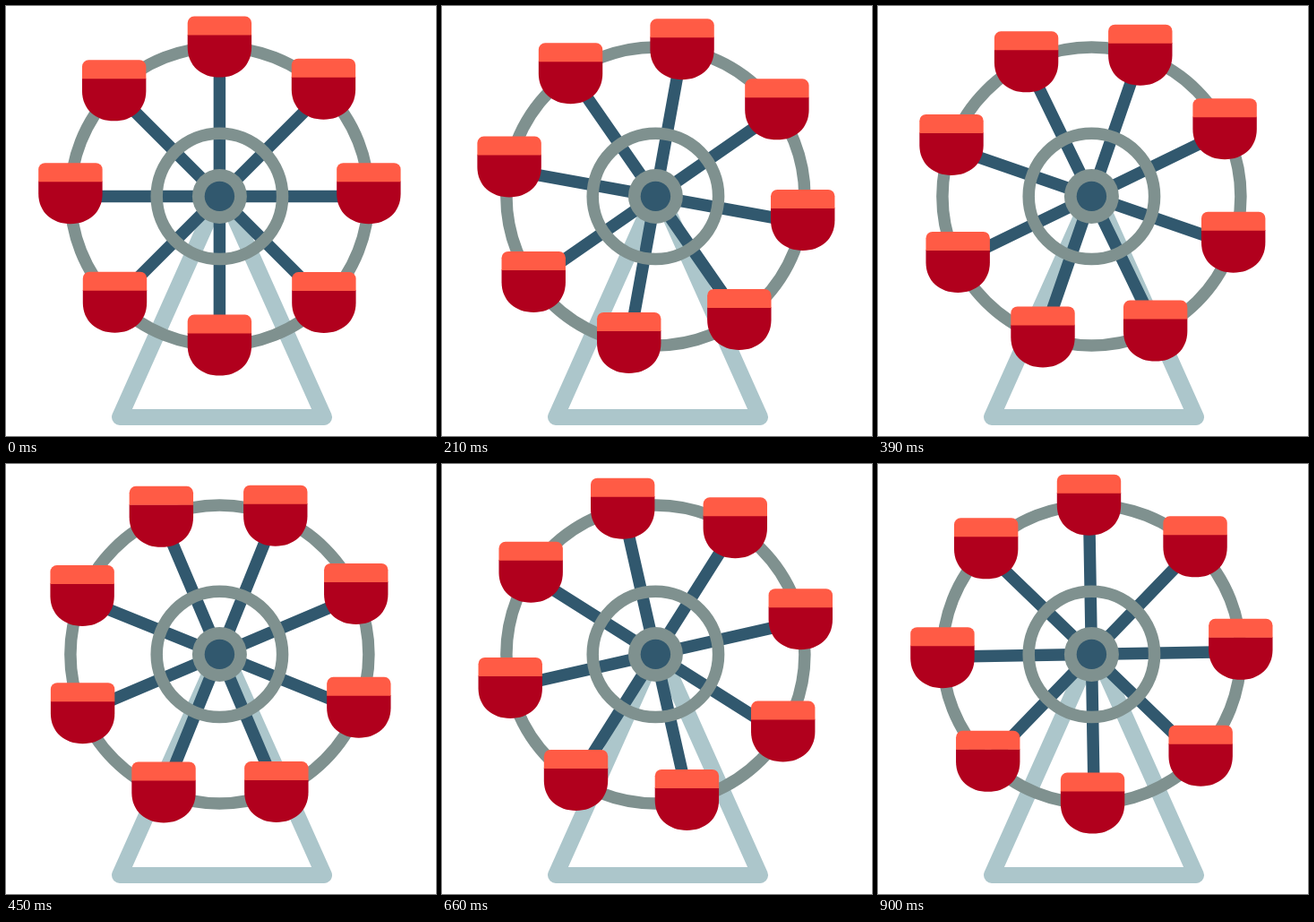
An HTML page that plays this animation: 480x480 px, repeating every 930 ms.

```html
<!DOCTYPE html>
<html lang="en">
<head>
<meta charset="utf-8">
<title>Ferris wheel</title>
<style>
  html, body { margin: 0; width: 100%; height: 100%; overflow: hidden; background: #fff; }
  svg { display: block; width: 100vw; height: 100vh; }
</style>
</head>
<body>
<svg viewBox="0 0 480 480">
  <defs>
    <g id="cabin">
      <path fill="#b1001d" d="M-35.7-14V0C-35.7 21-20 33.7 0 33.7S35.7 21 35.7 0V-14z"/>
      <path fill="#ff5b45" d="M-35.7-13.3V-27a7.3 7.3 0 0 1 7.3-7.3H28.4a7.3 7.3 0 0 1 7.3 7.3V-13.3z"/>
    </g>
  </defs>
  <path d="M127 459L241 204L355 459z" fill="none" stroke="#acc6cb" stroke-width="18" stroke-linejoin="round"/>
  <g transform="translate(238.4 212.4)">
    <g fill="none" stroke="#7f918f" stroke-width="13.5">
      <circle r="166.5"/>
      <path id="spokes" stroke="#31586e" d="M0-166V166M-166 0H166M-117-117L117 117M-117 117L117-117"/>
      <circle r="70.2"/>
    </g>
    <circle r="30.5" fill="#7f918f"/>
    <circle r="16.7" fill="#31586e"/>
    <g id="cabins"></g>
  </g>
</svg>
<script>
const LOOP = 930, STEP = 30, RADIUS = 166.5;
const DEGREES_PER_STEP = 44 / 30;
// Starting angles, clockwise from the top; the cabins are slightly uneven.
const startAngles = [0, 44.2, 89, 135.6, 180, 224.6, 271, 315];
const spokes = document.getElementById('spokes');
const holder = document.getElementById('cabins');

const cabins = startAngles.map(start => {
  const el = document.createElementNS('http://www.w3.org/2000/svg', 'use');
  el.setAttribute('href', '#cabin');
  holder.append(el);
  return { el, start };
});

function draw(now) {
  const turn = Math.floor(now % LOOP / STEP) * DEGREES_PER_STEP;
  spokes.setAttribute('transform', `rotate(${turn})`);
  for (const { el, start } of cabins) {
    const a = (start + turn) * Math.PI / 180;
    el.setAttribute('transform', `translate(${RADIUS * Math.sin(a)} ${-RADIUS * Math.cos(a)})`);
  }
}

const origin = performance.now();
function tick() {
  draw(performance.now() - origin);
  requestAnimationFrame(tick);
}
tick();
</script>
</body>
</html>
```
